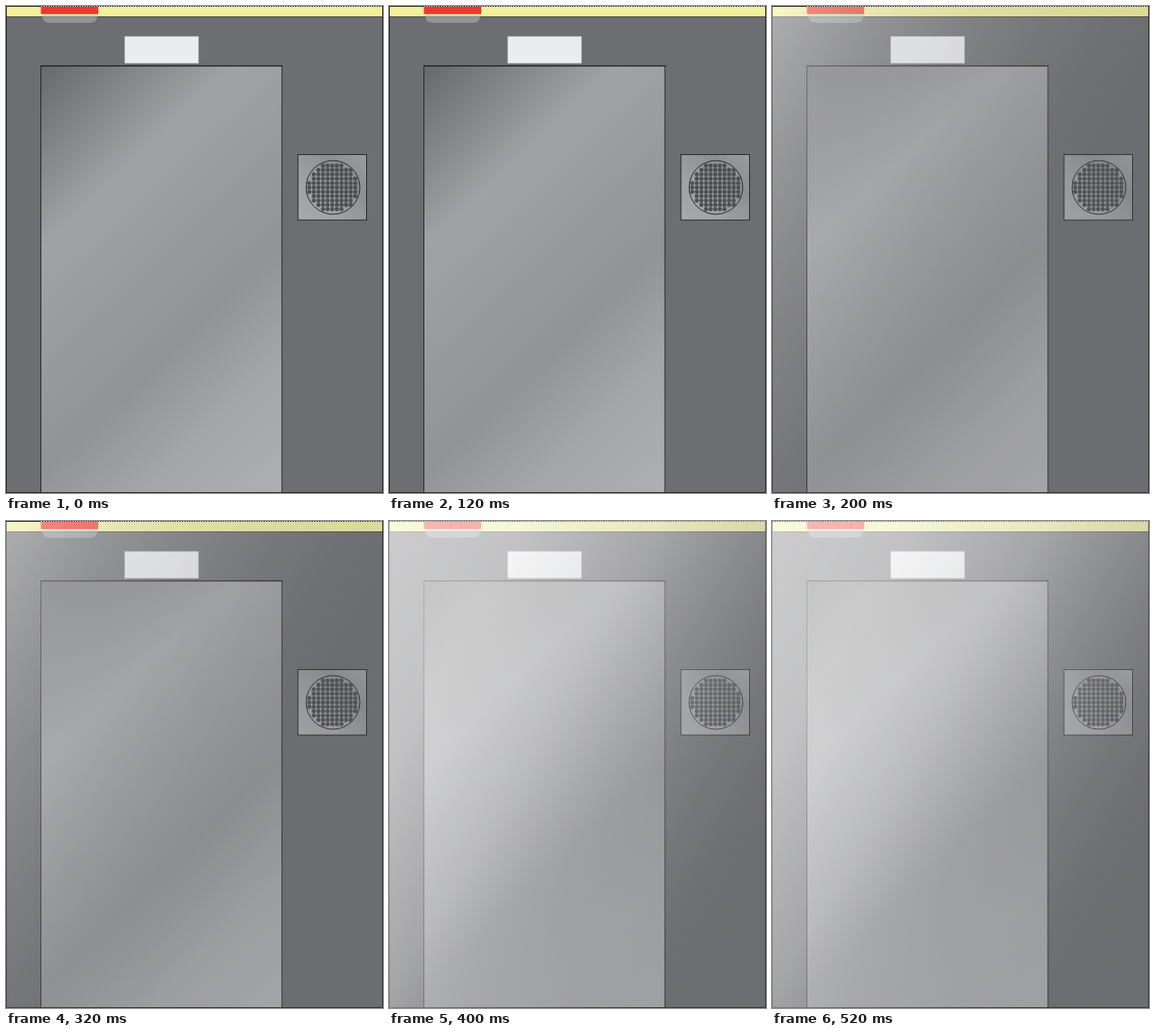
These frames come from a looping animation (470 by 608 pixels, 0.6 s). An HTML page:

```html
<!DOCTYPE html>
<html lang="en">
<head>
<meta charset="utf-8">
<title>Elevator door shine</title>
<style>
  html, body { margin: 0; width: 100%; height: 100%; overflow: hidden; background: #6d6e71; }
  svg { display: block; width: 470px; height: 608px; }
  .shine { opacity: 0; animation: 600ms step-end infinite; }
  .soft { animation-name: soft; }
  .bright { animation-name: bright; }
  @keyframes soft { 0% { opacity: 0 } 33.333% { opacity: 1 } 66.667%, 100% { opacity: 0 } }
  @keyframes bright { 0% { opacity: 0 } 66.667% { opacity: 1 } 100% { opacity: 0 } }
</style>
</head>
<body>
<svg viewBox="0 0 470 608">
  <defs>
    <linearGradient id="door" gradientUnits="userSpaceOnUse" x1="43" y1="75" x2="453" y2="506">
      <stop offset="0" stop-color="#676869"/>
      <stop offset=".16" stop-color="#88898a"/>
      <stop offset=".28" stop-color="#a1a2a5"/>
      <stop offset=".62" stop-color="#929396"/>
      <stop offset=".8" stop-color="#a5a6a9"/>
      <stop offset="1" stop-color="#aeafb2"/>
    </linearGradient>
    <linearGradient id="plate" gradientUnits="userSpaceOnUse" x1="366" y1="265" x2="448" y2="187">
      <stop offset="0" stop-color="#a8a9ac"/>
      <stop offset=".3" stop-color="#a0a1a4"/>
      <stop offset=".7" stop-color="#8d8e91"/>
      <stop offset="1" stop-color="#9b9c9f"/>
    </linearGradient>
    <linearGradient id="soft" gradientUnits="userSpaceOnUse" x1="0" y1="0" x2="371" y2="218">
      <stop offset="0" stop-color="#fff" stop-opacity=".45"/>
      <stop offset="1" stop-color="#6a6b6e" stop-opacity=".15"/>
    </linearGradient>
    <linearGradient id="bright" gradientUnits="userSpaceOnUse" x1="0" y1="0" x2="517" y2="304">
      <stop offset="0" stop-color="#fff" stop-opacity=".65"/>
      <stop offset=".25" stop-color="#fafafa" stop-opacity=".61"/>
      <stop offset=".5" stop-color="#dedede" stop-opacity=".5"/>
      <stop offset="1" stop-color="#6a6b6e" stop-opacity=".2"/>
    </linearGradient>
  </defs>

  <rect width="470" height="608" fill="#6d6e71"/>

  <!-- top rail -->
  <rect y="1" width="470" height="12.5" fill="#f2f09b"/>
  <path d="M0 13.5H470" stroke="#3c3c3a"/>
  <path d="M45 10H114V11Q114 21 104 21H55Q45 21 45 11Z" fill="#b8b9bc" fill-opacity=".5"/>
  <rect x="43.5" y="1" width="71.5" height="9" fill="#f2382c"/>

  <!-- sign -->
  <rect x="148" y="38" width="92" height="33.5" fill="#ebecee" stroke="#b9bab8" stroke-width=".6"/>

  <!-- door -->
  <rect x="43.5" y="74.5" width="300.5" height="540" fill="url(#door)" stroke="#231f20"/>
  <path d="M43 74.7H344.5" stroke="#231f20" stroke-width="1.6"/>

  <!-- speaker -->
  <rect x="364" y="185.5" width="85.5" height="81.7" fill="url(#plate)" stroke="#231f20"/>
  <circle cx="407.6" cy="226.5" r="33.5" fill="none" stroke="#231f20"/>
  <path fill="none" stroke="#4f5053" stroke-width="5.2" stroke-linecap="round" stroke-dasharray="0 5.75"
    d="M395.2 199.2h23.2M389.5 204.7h40.5M383.7 210.1h46.2M383.7 215.6h52M378 221h57.7M378 226.4h57.7
       M378 231.9h57.7M383.7 237.3h52M383.7 242.8h46.2M389.5 248.2h40.5M395.2 253.6h23.2"/>

  <path d="M.5 1V607.5H469.5V1" fill="none" stroke="#231f20"/>

  <rect class="shine soft" y="1" width="470" height="607" fill="url(#soft)"/>
  <rect class="shine bright" y="1" width="470" height="607" fill="url(#bright)"/>

  <!-- dotted top edge -->
  <path d="M0 .5H470" stroke="#fff"/>
  <path d="M0 .5H470" stroke="#333" stroke-dasharray="2 1"/>
  <path d="M0 .5H43" stroke="#231f20"/>
  <g class="shine bright">
    <path d="M0 .5H470" stroke="#fff"/>
    <path d="M0 .5H470" stroke="#777" stroke-dasharray="2 1"/>
  </g>
</svg>
</body>
</html>
```
